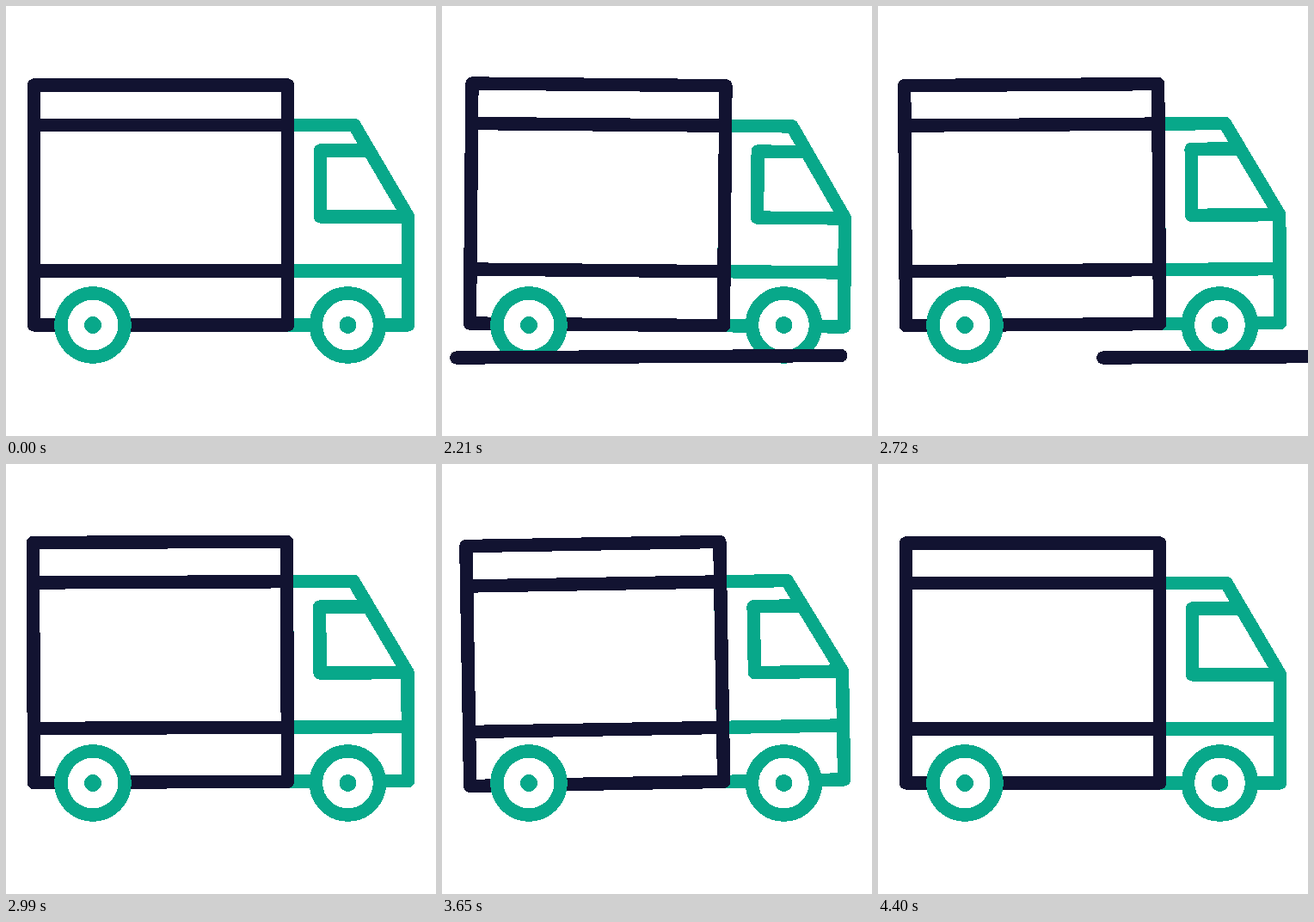
Recreate the animation shown at these times as an HTML page. Size 500 px wide and 500 px high, loop 4430 ms.

```html
<!DOCTYPE html>
<html lang="en">
<head>
<meta charset="utf-8">
<title>Rocking truck</title>
<style>
  html, body { margin: 0; height: 100%; overflow: hidden; background: #fff; }
  svg { display: block; width: 100%; height: 100%; shape-rendering: crispEdges; }
  svg * { stroke-width: 15.4; stroke-linecap: round; stroke-linejoin: round; }
  .green { stroke: #08a88a; fill: none; }
  .dark { stroke: #121331; fill: none; }
  .wheel { stroke: #08a88a; fill: #fff; }
  .hub { fill: #08a88a; }
</style>
</head>
<body>
<svg viewBox="0 0 500 500">
  <g id="body">
    <path class="green" d="M327.5 138.5H405L467.5 245V371H327.5ZM421 168H365.5V245H467.5M327.5 308H467.5"/>
    <path class="dark" d="M32.5 92H327.5V371H32.5ZM32.5 138.5H327.5M32.5 308H327.5"/>
  </g>
  <circle class="wheel" cx="101" cy="371" r="37"/>
  <circle class="hub" cx="101" cy="371" r="10"/>
  <circle class="wheel" cx="397.5" cy="371" r="37"/>
  <circle class="hub" cx="397.5" cy="371" r="10"/>
  <path id="road" class="dark" d="M-223.5 409L223.5 406.5"/>
</svg>
<script>
const LOOP = 4430, START = 2030;
const PASS_EVERY = 600, PASS_TIME = 360, PASSES = 3;
const truck = document.getElementById('body');
const road = document.getElementById('road');

// time in ms, tilt in degrees, vertical shift
const poses = [
  [1930, 0, 0], [2390, 0.78, 0], [2620, -0.9, -0.5], [2860, 0.45, -1.5], [3130, -1, -1.4],
  [3420, 0.92, 0], [3690, -1.1, -0.3], [3930, 0.45, 0], [4160, 0, 0], [LOOP, 0, 0]
];

function poseAt(t) {
  if (t < START) return [0, 0];
  const i = poses.findIndex(p => p[0] > t);
  const a = poses[i - 1], b = poses[i];
  const k = (1 - Math.cos(Math.PI * (t - a[0]) / (b[0] - a[0]))) / 2;
  return [1, 2].map(j => a[j] + (b[j] - a[j]) * k);
}

function draw(now) {
  const t = now % LOOP;
  const [tilt, shift] = poseAt(t);
  truck.setAttribute('transform', `translate(0 ${shift}) rotate(${tilt} 250 360)`);

  const since = t - START;
  const phase = since % PASS_EVERY;
  const visible = since >= 0 && since < PASSES * PASS_EVERY && phase < PASS_TIME;
  road.setAttribute('visibility', visible ? 'visible' : 'hidden');
  road.setAttribute('transform', `translate(${733 - 490 * phase / 180} 0)`);
  requestAnimationFrame(draw);
}
requestAnimationFrame(draw);
</script>
</body>
</html>
```
